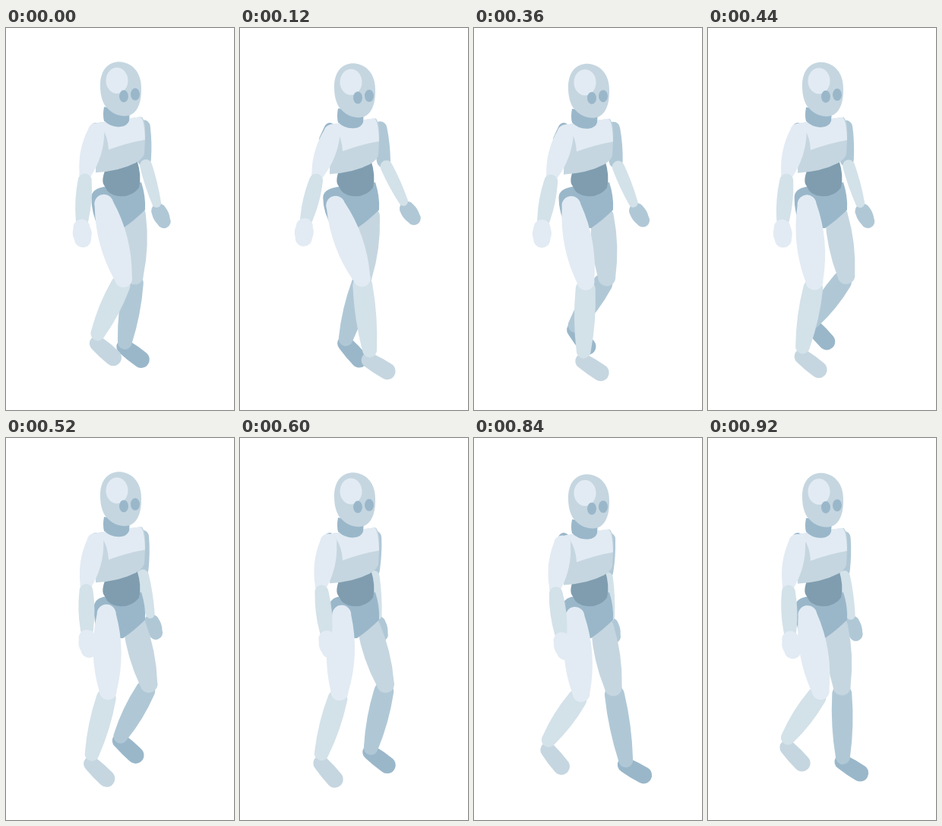
Animation, 300 px wide and 500 px high, one loop 940 ms. Source, as an HTML page with a canvas:

```html
<!DOCTYPE html>
<html lang="en">
<head>
<meta charset="utf-8">
<title>Walking mannequin</title>
<style>
html, body { margin: 0; width: 100%; height: 100%; overflow: hidden; background: #fff; }
canvas { display: block; width: 100%; height: 100%; }
</style>
</head>
<body>
<canvas id="stage" width="300" height="500"></canvas>
<script>
const ctx = document.getElementById('stage').getContext('2d');
const LOOP = 940, STEPS = 13;
const LIGHT = '#e2ebf3', PALE = '#d3e1e9', SOFT = '#c5d6e0',
      MID = '#b0c8d6', BLUE = '#9ab7ca', DARK = '#7f9daf';

// Cosine over the walk cycle, highest at the given step.
const wave = (step, peak, harmonic = 1) =>
  Math.cos(2 * Math.PI * harmonic * (step - peak) / STEPS);

// Point at a distance from p; 0 degrees hangs straight down, positive leans right.
function reach([x, y], length, degrees) {
  const a = degrees * Math.PI / 180;
  return [x + length * Math.sin(a), y + length * Math.cos(a)];
}

// Rounded limb from a to b with half widths at start, middle and end.
function limb(color, a, b, ra, rm, rb) {
  const dx = b[0] - a[0], dy = b[1] - a[1], len = Math.hypot(dx, dy);
  const bulge = 2 * rm - (ra + rb) / 2;
  ctx.save();
  ctx.translate(a[0], a[1]);
  ctx.rotate(Math.atan2(dy, dx));
  ctx.beginPath();
  ctx.arc(0, 0, ra, Math.PI / 2, -Math.PI / 2);
  ctx.quadraticCurveTo(len / 2, -bulge, len, -rb);
  ctx.arc(len, 0, rb, -Math.PI / 2, Math.PI / 2);
  ctx.quadraticCurveTo(len / 2, bulge, 0, ra);
  ctx.fillStyle = color;
  ctx.fill();
  ctx.restore();
}

function shape(color, d, y = 0) {
  ctx.save();
  ctx.translate(0, y);
  ctx.fillStyle = color;
  ctx.fill(new Path2D(d));
  ctx.restore();
}

function oval(color, x, y, rx, ry) {
  ctx.beginPath();
  ctx.ellipse(x, y, rx, ry, 0, 0, 2 * Math.PI);
  ctx.fillStyle = color;
  ctx.fill();
}

// Both legs share one gait; lag delays the lower leg, lean tilts the thigh.
function drawLeg(step, hip, { colors, length, lean, lag, drop, widths }) {
  const late = step - lag;
  const shinAngle = -13 + 20 * wave(late, 3.9) + 8 * wave(late, 2.5, 2);
  const knee = reach(hip, length, lean + 11 * wave(step, 2.1));
  const ankle = reach(knee, 92 + 0.5 * shinAngle, shinAngle);
  const heel = [ankle[0] - 1, ankle[1] + drop];
  const [thigh, shin, foot] = colors;
  limb(foot, heel, reach(heel, 28, 49 + 12 * wave(late, 3.25)), 10, 11, 11);
  limb(shin, reach(knee, 10, shinAngle), ankle, 13, 13.5, 9.5);
  limb(thigh, hip, knee, ...widths, 11.5);
}

// Arms swing against each other: side is 1 for the far arm, -1 for the near one.
function armJoints(swing, side, shoulder, length, upperRest, foreRest) {
  const foreAngle = foreRest + 13 * side * swing;
  const elbow = reach(shoulder, length, upperRest + 6 * side * swing);
  const wrist = reach(elbow, 59, foreAngle);
  const palm = reach(wrist, 11, foreAngle);
  return { shoulder, elbow, fore: reach(elbow, 8, foreAngle), wrist, palm,
           tip: reach(palm, 15, foreAngle + 10) };
}

function drawFarArm(swing, bob) {
  const arm = armJoints(swing, 1, [180.5 + 4.5 * swing, 130 + bob], 43, 1, 15);
  limb(MID, arm.palm, arm.tip, 10, 10.5, 9);
  limb(MID, arm.shoulder, arm.elbow, 9, 10, 9);
  limb(PALE, arm.fore, arm.wrist, 8, 8, 6);
}

function drawNearArm(swing, bob) {
  const arm = armJoints(swing, -1, [118.5 + 3 * swing, 136 + bob], 58, -14, -3);
  limb(LIGHT, arm.shoulder, arm.elbow, 11, 13.5, 8);
  limb(PALE, arm.fore, arm.wrist, 9, 10.5, 8.5);
  limb(LIGHT, arm.palm, arm.tip, 11, 12.5, 11);
}

function drawTorso(bob) {
  shape(DARK, 'M128 204Q126 198 130 187L172 172Q179 194 175 209Q165 222 148 220Q134 218 131 209Z');
  shape(SOFT, 'M119 125L178 117Q184 120 183 146L182 165Q181 171 171 177Q150 188 118 190Z', bob);
  shape(LIGHT, 'M119 125L176 117Q182 118 183 147Q160 151 135 160Q134 142 126 131Z', bob);
}

function drawHead(bob) {
  shape(BLUE, 'M129 104Q127 115 129 122Q138 131 150 130Q160 129 162 122L163 108Z', bob);
  shape(SOFT, 'M124 76C124 54 136 45 149 45C168 46 179 61 178 82C178 100 172 116 156 116C143 116 134 107 130 102C126 95 124 87 124 76Z', bob);
  oval(LIGHT, 146, 69.5 + bob, 14.5, 17);
  oval(BLUE, 155, 90 + bob, 6, 8);
  oval(BLUE, 170, 87.5 + bob, 6, 8);
}

const farLeg = { colors: [SOFT, MID, BLUE], length: 79, lean: 6, lag: 0.75, drop: 6, widths: [15, 16.5] };
const nearLeg = { colors: [LIGHT, PALE, SOFT], length: 101, lean: 9, lag: 0, drop: 13, widths: [12.5, 18.5] };

function draw(step) {
  const swing = wave(step, 3.1);
  const bob = 1.2 + 2 * wave(step, 3.6, 2);
  const sway = 4.5 * wave(step, 9.2);
  const left = 113.5 + sway;
  ctx.fillStyle = '#fff';
  ctx.fillRect(0, 0, 300, 500);
  drawFarArm(swing, bob);
  limb(BLUE, [118, 131], [111, 146], 7, 7, 7);
  drawLeg(step + STEPS / 2, [169, 246 + bob], farLeg);
  shape(BLUE, `M${left} 222Q${left} 211 128 208L178 202Q184 220 183 238Q170 251 154 262H122Q${left} 242 ${left} 222Z`);
  drawLeg(step, [130 + sway, 231 + bob], nearLeg);
  drawTorso(bob);
  drawHead(bob);
  drawNearArm(swing, bob);
}

function tick(now) {
  const t = now % LOOP;
  draw(t < 40 ? 0 : 1 + Math.floor((t - 40) / 80));
  requestAnimationFrame(tick);
}
tick(0);
</script>
</body>
</html>
```
